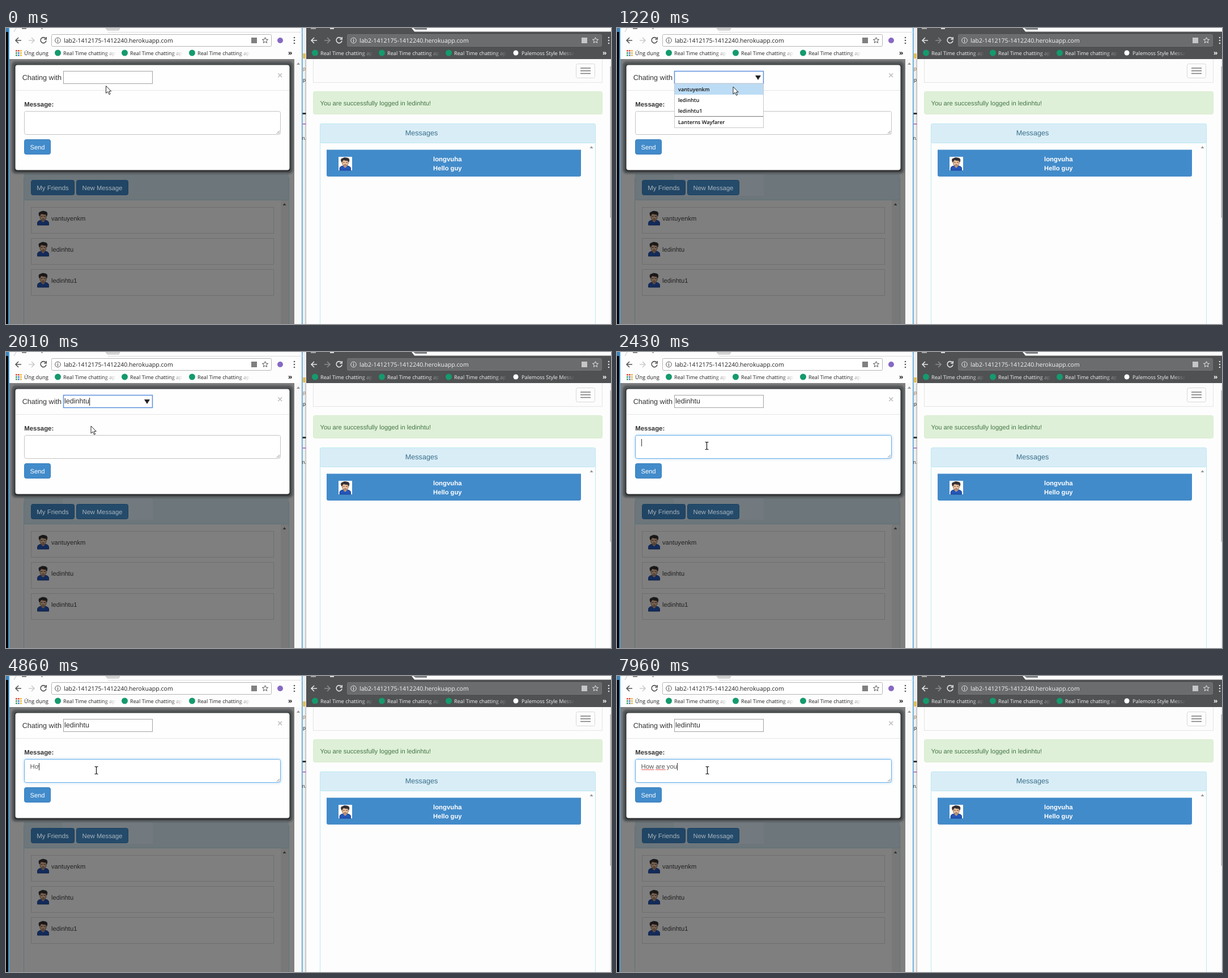
Recreate the animation shown at these times as an HTML page. Size 1068 px wide and 524 px high, loop 8000 ms.

```html
<!DOCTYPE html>
<html lang="en">
<head>
<meta charset="utf-8">
<title>Chat between two windows</title>
<style>
html, body { margin: 0; width: 100%; height: 100%; overflow: hidden; background: #fdfdfd; }
svg { display: block; width: 1068px; height: 524px; }
text { font-family: "Liberation Sans", Arial, sans-serif; font-size: 11.2px; white-space: pre; text-rendering: geometricPrecision; }
.ui { font-family: "Open Sans", "Noto Sans", sans-serif; }
.mid { text-anchor: middle; }
.b { font-weight: 700; }
.shade { filter: blur(1.5px); }
.focus { filter: drop-shadow(0 0 2.5px rgba(102, 175, 233, .45)); }
</style>
</head>
<body>
<svg id="stage" viewBox="0 0 1068 524" xmlns="http://www.w3.org/2000/svg"></svg>
<script>
const LOOP = 8000;
const FRIENDS = ["vantuyenkm", "ledinhtu", "ledinhtu1"];
const PEER = FRIENDS[1];

// Drawing helpers
const rect = (x, y, w, h, fill, more = "") =>
  `<rect x="${x}" y="${y}" width="${w}" height="${h}" fill="${fill}" ${more}/>`;
const box = (x, y, w, h, fill, stroke, r = 0, more = "") =>
  rect(x + .5, y + .5, w - 1, h - 1, fill, `stroke="${stroke}" rx="${r}" ${more}`);
const text = (x, y, str, fill, size = 11.2, cls = "", more = "") =>
  `<text x="${x}" y="${y}" fill="${fill}" style="font-size:${size}px" class="${cls}" ${more}>${str}</text>`;
const path = (d, stroke, width = 1, fill = "none", more = "") =>
  `<path d="${d}" stroke="${stroke}" stroke-width="${width}" fill="${fill}" ${more}/>`;
const disc = (x, y, r, fill) => `<circle cx="${x}" cy="${y}" r="${r}" fill="${fill}"/>`;
const group = (inner, more = "") => `<g ${more}>${inner}</g>`;
const upArrow = (x, y, fill) => path(`M${x - 3} ${y + 2}h6l-3 -4z`, "none", 0, fill);

function star(x, y, colour) {
  let d = "";
  for (let i = 0; i < 10; i++) {
    const r = i % 2 ? 2.4 : 5.4, a = i * Math.PI / 5 - Math.PI / 2;
    d += (i ? "L" : "M") + (x + r * Math.cos(a)).toFixed(2) + " " + (y + r * Math.sin(a)).toFixed(2);
  }
  return path(d + "z", colour);
}

function avatar(x, y) {
  return group(
    path("M.5 26V22Q1 18 7 17H14Q20 18 20.5 22V26z", "#14347c", .8, "#2456b8") +
    path("M7.5 15h6v3.5l-3 2.5l-3 -2.5z", "none", 0, "#d9a27c") +
    `<ellipse cx="10.5" cy="11" rx="5.6" ry="6.6" fill="#eec09c" stroke="#50382c" stroke-width=".7"/>` +
    path("M4 10Q1 3 6 2.5Q9 0 13 1.5Q20 2 17 10L15.5 7Q10 7 8 5.5Q6 6 5.5 8z", "#222", .6, "#353033") +
    path("M6.7 10.5h2.6M11.8 10.5h2.6M8.8 15h3.6", "#4a3028", 1),
    `transform="translate(${x} ${y})"`);
}

function bookmark(x, label, colour, bg, icon, id) {
  return icon + text(x, 47.5, label, colour, 9.2, "ui") +
    `<linearGradient id="${id}"><stop stop-color="${bg}" stop-opacity="0"/><stop offset="1" stop-color="${bg}"/></linearGradient>` +
    rect(x + 70, 37, 24, 15, `url(#${id})`) + rect(x + 93.5, 37, 8, 15, bg);
}

function toolbar(dx, c) {
  const X = n => n + dx;
  return rect(c.left, 0, c.width, 55, c.bg) +
    path(`M${X(27)} 22h-10m5 -5l-5 5l5 5`, c.icon, 1.6) +
    path(`M${X(40)} 22h10m-5 -5l5 5l-5 5`, c.dim, 1.6) +
    path(`M${X(70)} 18.5a5 5 0 1 0 1 4M${X(71.2)} 16v4h-4`, c.icon, 1.6) +
    box(X(80), 11, c.barEnd - X(80), 22, c.field, c.edge, 2) +
    `<circle cx="${X(91.5)}" cy="22" r="4.8" fill="none" stroke="${c.icon}"/>` +
    path(`M${X(91.5)} 21v4M${X(91.5)} 19v1.2`, c.icon, 1.2) +
    text(X(102), 25.8, "lab2-1412175-1412240.herokuapp.com", c.ink, 10.55, "ui") +
    rect(c.barEnd - 36, 17, 10, 10, c.icon, 'opacity=".75"') +
    star(c.barEnd - 11.5, 22, c.icon) +
    [17, 22, 27].map(y => disc(c.menu, y, 1.3, c.icon)).join("") +
    text(c.more, 47.5, "»", c.ink, 12, "ui b") +
    c.marks.map(x => bookmark(x, "Real Time chatting ap", c.ink, c.bg,
      disc(x - 9.5, 44, 5.5, "#159a6c"), "fade" + x)).join("");
}

function leftPage() {
  const rows = FRIENDS.map((name, i) => {
    const y = 317 + i * 55;
    return box(44, y, 429, 47, "#fff", "#ddd") + avatar(55, y + 6) +
      text(80, y + 23.5, name, "#444");
  }).join("");
  const labels = text(82.5, 286.5, "My Friends", "#a9b4bd", 11.4, "mid") +
    text(170, 286.5, "New Message", "#a9b4bd", 11.2, "mid");
  return rect(6, 55, 503, 469, "#fff") +
    box(31, 262, 469, 280, "#fff", "#bce8f1", 3) + rect(32, 258, 467, 46, "#d9edf7") +
    path("M31 304.5h469", "#bce8f1") +
    rect(100, 257, 159, 40, "#e6f6ff", 'id="patch"') +
    box(44, 269, 77, 27, "#428bca", "#357ebd", 3) +
    box(124, 269, 92, 27, "#428bca", "#357ebd", 3, 'id="newBtn"') +
    rows + rect(485, 305, 14, 219, "#f1f1f1") + upArrow(491.5, 312, "#666") +
    rect(6, 55, 503, 469, "rgba(0,0,0,.5)") + labels;
}

function modal() {
  return rect(10, 59, 497, 199, "rgba(20,30,36,.4)", 'rx="7" class="shade"') +
    rect(15, 65, 487, 189, "rgba(0,0,0,.6)", 'rx="4" class="shade"') +
    rect(16.5, 65.5, 484, 186, "#fefefe", 'rx="4"') +
    text(28.7, 91.5, "Chating with", "#333", 12.6) +
    text(479, 88.5, "×", "#c4c4c4", 16, "b") +
    path("M17 110.5h483", "#e5e5e5") +
    text(32.3, 139, "Message:", "#333", 11.4, "b") +
    box(101, 76, 158, 23, "#fff", "#a3a3a3", 0, 'id="field"') +
    path("M244 84h10l-5 8z", "none", 0, "#222", 'id="drop"') +
    text(103, 91.3, "", "#333", 12.6, "", 'id="chosen"') +
    rect(103, 81, 1, 14, "#222", 'id="fieldCaret"') +
    box(32, 147, 453, 42, "#fff", "#c4c4c4", 3, 'id="area"') +
    path("M478 187l5 -5M481 187l2 -2", "#777", .9) +
    text(42.6, 164, "", "#555", 11.3, "", 'id="typed"') +
    rect(43, 154, 1, 13, "#333", 'id="caret"') +
    squiggle(43, 65, "wave1") + squiggle(68, 85, "wave2") +
    box(32, 197, 47, 27, "#428bca", "#357ebd", 3) + text(55.5, 214.5, "Send", "#fff", 11.2, "mid");
}

function squiggle(from, to, id) {
  let d = `M${from} 166.5`;
  for (let x = from, up = true; x < to; x += 1.5, up = !up) d += `l1.5 ${up ? -1.5 : 1.5}`;
  return path(d, "#e02020", .9, "none", `id="${id}"`);
}

function dropdown() {
  const items = [...FRIENDS, "Lanterns Wayfarer"];
  return group(box(101, 98, 158, 79, "#fff", "#c8c8c8") +
    rect(102, 99, 156, 19, "#bcdcf5", 'id="hover"') +
    path("M102 156.5h156", "#777") +
    items.map((s, i) => text(108, 112 + i * 19 + (i > 2 ? 1 : 0), s, "#111", 9.2, "ui", 'font-weight="600"')).join(""),
    'id="list"');
}

function rightPage() {
  return rect(530, 55, 538, 469, "#fdfdfd") +
    path("M542.5 55V96.5H1052.5V55", "#e4e4e4", 1, "#fcfcfc") +
    box(1006, 63, 34, 26, "#fdfdfd", "#d8d8d8", 3) +
    path("M1014 71h18M1014 75.7h18M1014 80.4h18", "#777", 1.5) +
    box(542, 112, 511, 41, "#dff0d8", "#d9ecd0", 3) +
    text(554.6, 136.5, `You are successfully logged in ${PEER}!`, "#447746") +
    box(554, 169, 487, 380, "#fdfdfd", "#bce8f1", 3) +
    box(554, 169, 487, 35, "#d9edf7", "#bce8f1", 3) +
    text(733.5, 190, "Messages", "#3a6f88", 12.6, "mid") +
    upArrow(1033.5, 211, "#999") +
    path("M566 215.5H1015V260Q1015 263 1012 263H569Q566 263 566 260z", "none", 0, "#428bca") +
    rect(587, 228, 24, 24, "#fff") + group(avatar(0, 0), 'transform="translate(588.5 228.5) scale(.98 .9)"') +
    text(779.3, 236, "longvuha", "#fff", 11.4, "mid b") +
    text(779.3, 252, "Hello guy", "#fff", 11.2, "mid b") +
    rect(1066, 55, 2, 469, "#f1f1f1") + rect(1066.5, 68, 1.5, 268, "#b4b4b4");
}

function topEdges() {
  return path("M14 7L18 0M176 0l3 4h20l2 -4z", "#c4c4c4", 1, "#d6d6d6") +
    rect(28, 0, 8, 2, "#888") + rect(62, 0, 3, 2, "#aaa") +
    path("M180 7.5H523", "#dcdcdc") +
    rect(538, 0, 9, 2, "#aaa") + rect(572, 0, 7, 2, "#ddd") +
    path("M716 0L721 6.5H1068V0z", "none", 0, "#fdfdfd") +
    path("M719 0l4 3h20v-3z", "none", 0, "#7c7f82");
}

function gap() {
  return rect(523, 0, 7, 524, "#eeeeee") + rect(522, 0, 1.5, 524, "#4aa0d8") + rect(528.5, 55, 1.5, 469, "#bbb") +
    text(524, 75, "p", "#a07040", 9) + text(524, 95, "p", "#222", 9) + rect(524, 45, 5, 9, "#e6bd58") +
    rect(523.5, 150, 6, 3, "#333") + rect(523.5, 169, 6, 2, "#b879c8") + text(522.5, 198, "n.", "#333", 9);
}

const light = { left: 5, width: 518, bg: "#fdfdfd", icon: "#555", dim: "#ccc", field: "#fff", edge: "#b5b5b5",
  ink: "#222", barEnd: 469, menu: 509, more: 498, marks: [101, 219, 338] };
const dark = { left: 530, width: 538, bg: "#4f5153", icon: "#e4e4e4", dim: "#8a8c8e", field: "#6a6c6e", edge: "#737577",
  ink: "#f4f4f4", barEnd: 1052, menu: 1064, more: 1053, marks: [555, 673, 791] };

function appsGrid() {
  const tones = ["#e2493a", "#e2493a", "#f1b52b", "#3da35a", "#3f7de0", "#f1b52b", "#3da35a", "#3f7de0", "#f1b52b"];
  return tones.map((c, i) => rect(17 + i % 3 * 4, 39 + Math.floor(i / 3) * 4, 2.7, 2.7, c)).join("") +
    text(32, 47.5, "Ứng dụng", "#222", 9.4, "ui");
}

const stage = document.getElementById("stage");
stage.innerHTML =
  rect(0, 0, 1068, 524, "#fdfdfd") + rect(0, 7, 4, 517, "#000") + rect(0, 0, 4, 7, "#3b82b8") +
  toolbar(0, light) + appsGrid() + disc(484, 22, 5, "#8668c4") +
  leftPage() + rect(4, 0, 2, 524, "#4aa0d8") + modal() +
  rect(509, 55, 14, 469, "#f8f8f8") + upArrow(516, 63, "#999") +
  gap() + toolbar(522, dark) +
  bookmark(910, "Palemoss Style Messa", dark.ink, dark.bg, disc(900, 44, 4.5, "#fff"), "fadeLast") +
  topEdges() + rightPage() + dropdown() +
  path("M0 0V13L3.2 10.2L5.6 15.2L7.6 14.3L5.3 9.4H9.2z", "#111", .9, "#fff", 'id="arrow"') +
  path("M-3 -6.5H-1L0 -5.5L1 -6.5H3M0 -5.5V5.5M-3 6.5H-1L0 5.5L1 6.5H3", "#111", 1.2, "none", 'id="beam"');

// Each track lists [start ms, value...]; the latest started step holds.
const tracks = {
  pointer: [[0, "arrow", 176.5, 102.5], [150, "beam", 190.5, 84], [660, "beam", 186.5, 89.5],
    [940, "arrow", 249, 84], [1070, "arrow", 262, 100], [1220, "arrow", 205, 104],
    [1350, "arrow", 152.5, 122], [1480, "arrow", 151, 125], [1610, "arrow", 150, 128],
    [2010, "arrow", 150, 131], [2150, "beam", 159.5, 150], [2280, "beam", 160.5, 165],
    [2430, "beam", 158.5, 166], [2570, "beam", 159.5, 167]],
  field: [[0, "idle"], [150, "hover"], [280, "focus"], [2430, "idle"]],
  fieldCaret: [[0, 0], [280, 1], [940, 0], [1890, 1], [2150, 0]],
  hover: [[0, -1], [1220, 0], [1350, 1]],
  typed: [[0, ""], [4430, "H"], [4570, "Ho"], [4860, "Hơ"], [5280, "How"], [5820, "How "], [5940, "How a"],
    [6220, "How ả"], [6480, "How ảe"], [6610, "How are"], [7000, "How are "], [7530, "How are y"],
    [7680, "How are yo"], [7960, "How are you"]],
  caret: [[0, 0], [2430, 1], [2970, 0], [3500, 1], [4030, 0], [4430, 1]]
};
const at = (name, t) => tracks[name].findLast(step => step[0] <= t).slice(1);

const el = Object.fromEntries([...stage.querySelectorAll("[id]")].map(n => [n.id, n]));
const show = (node, on) => node.setAttribute("visibility", on ? "visible" : "hidden");
const set = (node, attrs) => { for (const k in attrs) node.setAttribute(k, attrs[k]); };

function render(t) {
  const [kind, x, y] = at("pointer", t);
  show(el.arrow, kind === "arrow");
  show(el.beam, kind === "beam");
  el[kind].setAttribute("transform", `translate(${x} ${y})`);

  const [mode] = at("field", t), focused = mode === "focus";
  set(el.field, { stroke: focused ? "#5b8fdc" : "#a3a3a3", "stroke-width": focused ? 1.5 : 1 });
  show(el.drop, mode !== "idle");
  el.chosen.textContent = t >= 1890 ? PEER : "";
  show(el.fieldCaret, at("fieldCaret", t)[0]);
  el.fieldCaret.setAttribute("x", 103 + el.chosen.getComputedTextLength());

  const [row] = at("hover", t);
  show(el.list, t >= 940 && t < 1890);
  show(el.hover, row >= 0 && t < 1890);
  el.hover.setAttribute("y", 99 + 19 * Math.max(row, 0));

  show(el.patch, t >= 280);
  set(el.newBtn, { fill: t >= 280 ? "#4a98d8" : "#428bca" });

  const writing = t >= 2430;
  set(el.area, { stroke: writing ? "#66afe9" : "#c4c4c4", class: writing ? "focus" : "" });
  el.typed.textContent = at("typed", t)[0];
  show(el.caret, at("caret", t)[0]);
  el.caret.setAttribute("x", Math.round(42.6 + el.typed.getComputedTextLength()));
  show(el.wave1, t >= 5820);
  show(el.wave2, t >= 7000);
}

const start = performance.now();
function tick() {
  render((performance.now() - start) % LOOP);
  requestAnimationFrame(tick);
}
tick();
</script>
</body>
</html>
```
